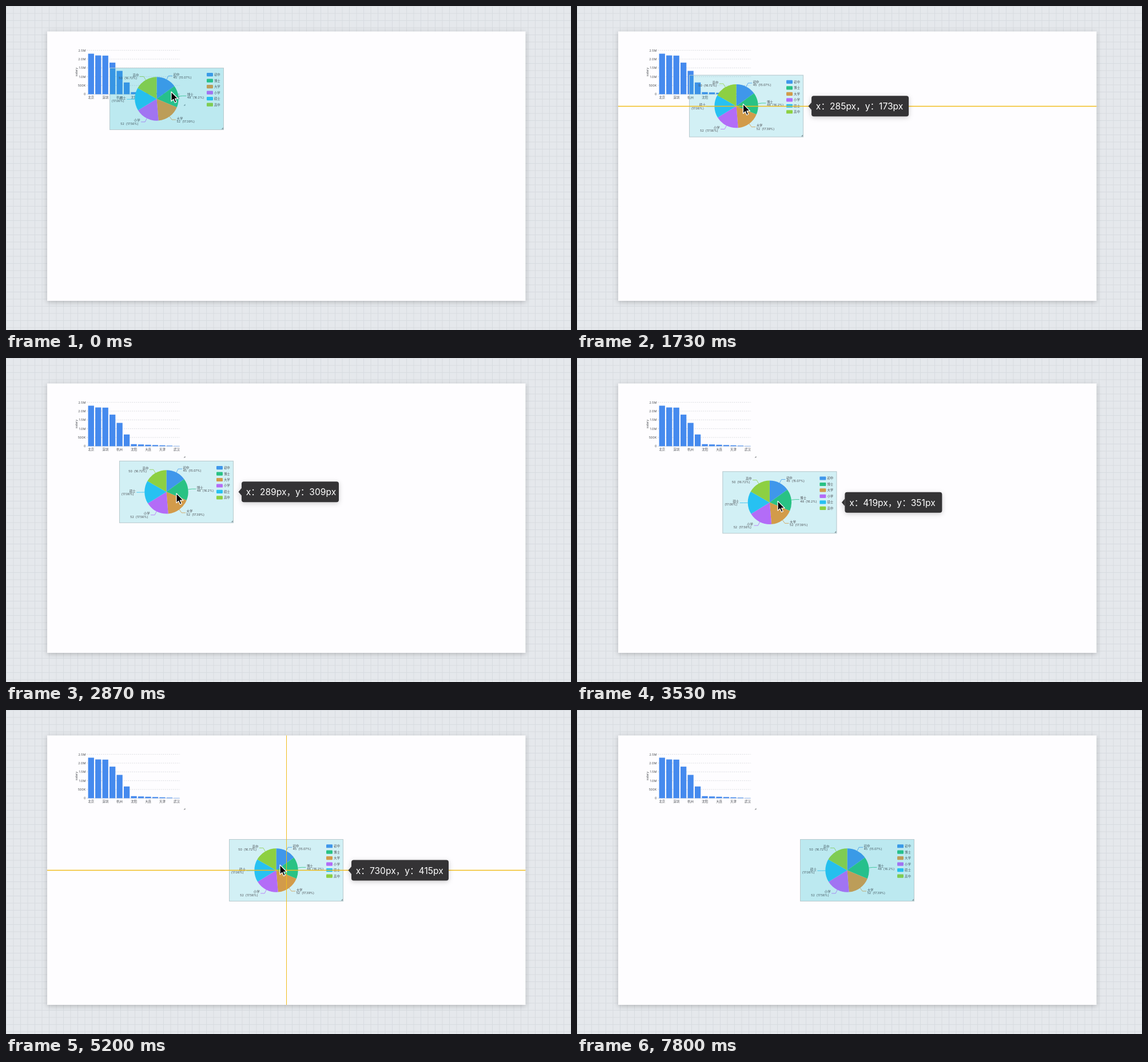
An HTML page that plays this animation: 988x567 px, repeating every 7940 ms.

```html
<!DOCTYPE html>
<html lang="zh">
<head>
<meta charset="utf-8">
<style>
  html, body { margin: 0; width: 100%; height: 100%; overflow: hidden; }
  svg { display: block; width: 988px; height: 567px; }
  text { font: 5.4px Inter, "Noto Sans CJK SC", "Noto Sans CJK", sans-serif; fill: #4a4d52; dominant-baseline: central; }
  #tip text { font-size: 15.6px; fill: #fff; }
  .end { text-anchor: end; }
  .mid { text-anchor: middle; }
  #tip { filter: drop-shadow(0 2px 4px rgba(0, 0, 0, .2)); }
  #page { filter: drop-shadow(0 2px 4px rgba(0, 0, 0, .22)); }
</style>
</head>
<body>
<svg viewBox="0 0 988 567">
  <defs>
    <pattern id="grid" width="12.5" height="12.5" patternUnits="userSpaceOnUse">
      <path d="M0 .5H12.5M.5 0V12.5" stroke="#d7dbe0" fill="none"/>
    </pattern>
  </defs>
  <rect width="988" height="567" fill="#e5e8ec"/>
  <rect width="988" height="567" fill="url(#grid)"/>
  <rect id="page" x="72" y="44.5" width="836.5" height="471.5" fill="#fefdff"/>
  <g id="bars"></g>
  <g id="card">
    <rect width="200" height="108.5" fill="rgba(18,176,200,.186)"/>
    <g id="pie"></g>
    <rect id="mask" width="200" height="108.5" fill="rgba(18,176,200,.115)"/>
    <rect width="199" height="108" x=".5" y=".5" fill="none" stroke="#b9c9cd"/>
    <path d="M198.8 104.5V107.5H195.8Z" fill="#7d8d92"/>
  </g>
  <path id="guideX" d="M.5 44.5V516" stroke="#f0bd1c"/>
  <path id="guideY" d="M72 .5H908.5" stroke="#f0bd1c" stroke-width="1.3"/>
  <g id="tip">
    <path d="M214 48L208.5 54.5L214 61Z" fill="#343335"/>
    <rect x="214" y="36.5" width="170" height="36" rx="4" fill="#343335"/>
    <text x="221.8" y="55"></text>
  </g>
  <path id="cursor" d="M0 0V16.8L3.8 13.3L6.4 19.3L9.2 18.1L6.6 12.2H12Z" fill="#000" stroke="#fff" stroke-width="1.2" stroke-linejoin="round"/>
</svg>
<script>
const LOOP = 7940, FPS = 15, PRESS = 730, MOVE = 1330, RELEASE = 5930, LEAVE = 7260;
const SCALE = .4355, LEFT = 72.1, TOP = 45.3; // page units to stage pixels
const $ = id => document.getElementById(id);

function add(parent, tag, attrs, text = '') {
  const el = document.createElementNS('http://www.w3.org/2000/svg', tag);
  for (const k in attrs) el.setAttribute(k, attrs[k]);
  el.textContent = text;
  parent.append(el);
}

function drawBars(g) {
  const base = 154.4, step = 15.36, pitch = 12.47;
  ['0', '500K', '1.0M', '1.5M', '2.0M', '2.5M'].forEach((label, i) => {
    const y = base - i * step;
    add(g, 'text', { x: 139.3, y, class: 'end' }, label);
    add(g, 'path', { d: `M141 ${y}H304`, stroke: '#d4d6da', 'stroke-width': .8, 'stroke-dasharray': i ? '2 1.6' : 'none' });
  });
  const millions = [2.31, 2.21, 2.2, 1.8, 1.33, .67];
  for (let i = 0; i < 13; i++) {
    const height = (millions[i] ?? (13 - i) * .017) * 2 * step;
    add(g, 'rect', { x: 143.6 + i * pitch, y: base - height, width: 10.3, height, fill: '#458aee' });
  }
  ['北京', '深圳', '杭州', '沈阳', '大连', '天津', '武汉'].forEach((label, i) =>
    add(g, 'text', { x: 148.8 + i * 2 * pitch, y: 160, class: 'mid' }, label));
  add(g, 'text', { transform: 'translate(123.3 115.5) rotate(-90)', class: 'mid' }, 'salary');
  add(g, 'path', { d: 'M313.5 171.5V174.5H310.5Z', fill: '#8b8f94' });
}

function drawPie(g) {
  const slices = [
    ['初中', 15.07, '#3f97eb'], ['博士', 16.2, '#29c284'], ['大学', 17.39, '#d29b4a'],
    ['小学', 17.56, '#b36cf7'], ['硕士', 17.06, '#27c1f2'], ['高中', 16.72, '#8dd042'],
  ];
  const cx = 82.5, cy = 54.5, r = 38.2;
  const point = (share, radius = r) => {
    const a = share * Math.PI / 50;
    return [cx + radius * Math.sin(a), cy - radius * Math.cos(a)];
  };
  let sum = 0;
  slices.forEach(([name, pct, fill], i) => {
    const mid = sum + pct / 2, [ex, ey] = point(mid, r + 7);
    const side = mid < 50 ? 1 : -1, x = ex + side * 8.5, cls = side < 0 ? 'end' : '';
    add(g, 'path', { d: `M${cx} ${cy}L${point(sum)}A${r} ${r} 0 0 1 ${point(sum += pct)}Z`, fill });
    add(g, 'path', { d: `M${point(mid)}L${ex} ${ey}h${side * 7}`, stroke: fill, 'stroke-width': .8, fill: 'none' });
    // The leftmost label has no room for its count
    const count = x < 40 ? '' : Math.floor(pct * 2.99 + .1) + '\u00a0 ';
    add(g, 'text', { x, y: ey - 2.4, class: cls }, name);
    add(g, 'text', { x: side < 0 ? x - 3 : x, y: ey + 2.9, class: cls }, `${count}(${pct}%)`);
    const row = 12.2 + i * 10.48;
    add(g, 'rect', { x: 170, y: row - 3.1, width: 11, height: 6.2, rx: 1.2, fill });
    add(g, 'text', { x: 183, y: row }, name);
  });
}

// Linear path through points [time, x, y]
function along(keys, t) {
  const i = keys.findIndex(k => k[0] > t);
  if (i < 1) return keys.at(i).slice(1);
  const a = keys[i - 1], b = keys[i], p = (t - a[0]) / (b[0] - a[0]);
  return [1, 2].map(n => a[n] + (b[n] - a[n]) * p);
}

const cardPath = [
  [MOVE, 250, 144], [2133, 319, 203], [2400, 355, 256], [2867, 289, 309],
  [3267, 330, 342], [4067, 596, 370], [4933, 730, 415],
];
// Pointer relative to the card
const grabPath = [
  [0, 108, 42], [800, 93, 48], [2133, 95, 52], [2867, 100, 57],
  [4067, 94, 48], [4933, 89, 45], [6600, 89, 45], [LEAVE, 257, 55],
];

// Card positions that align with the page centre or the bar chart
const snapsX = [730], snapsY = [173, 415];
const snap = (value, lines) => lines.find(line => Math.abs(line - value) < 8);

const place = (id, x, y) => $(id).setAttribute('transform', `translate(${x} ${y})`);
const show = (id, on) => $(id).style.display = on ? '' : 'none';

function render(now) {
  const t = Math.floor((now % LOOP + 4) * FPS / 1000) * 1000 / FPS;
  const [rawX, rawY] = along(cardPath, t), [gx, gy] = along(grabPath, t);
  const snapX = snap(rawX, snapsX), snapY = snap(rawY, snapsY);
  const x = snapX ?? rawX, y = snapY ?? rawY;
  const px = LEFT + x * SCALE, py = TOP + y * SCALE;
  const dragging = t > MOVE && t < RELEASE;
  place('card', px, py);
  place('tip', px, py);
  place('cursor', px + gx, py + gy);
  place('guideX', Math.round(px + 100), 0);
  place('guideY', 0, Math.round(py + 54));
  $('tip').querySelector('text').textContent = `x：${Math.round(x)}px，y：${Math.round(y)}px`;
  show('mask', t < PRESS || t >= RELEASE);
  show('tip', dragging);
  show('guideX', dragging && snapX);
  show('guideY', dragging && snapY);
  show('cursor', t < LEAVE);
  requestAnimationFrame(render);
}

drawBars($('bars'));
drawPie($('pie'));
requestAnimationFrame(render);
</script>
</body>
</html>
```
